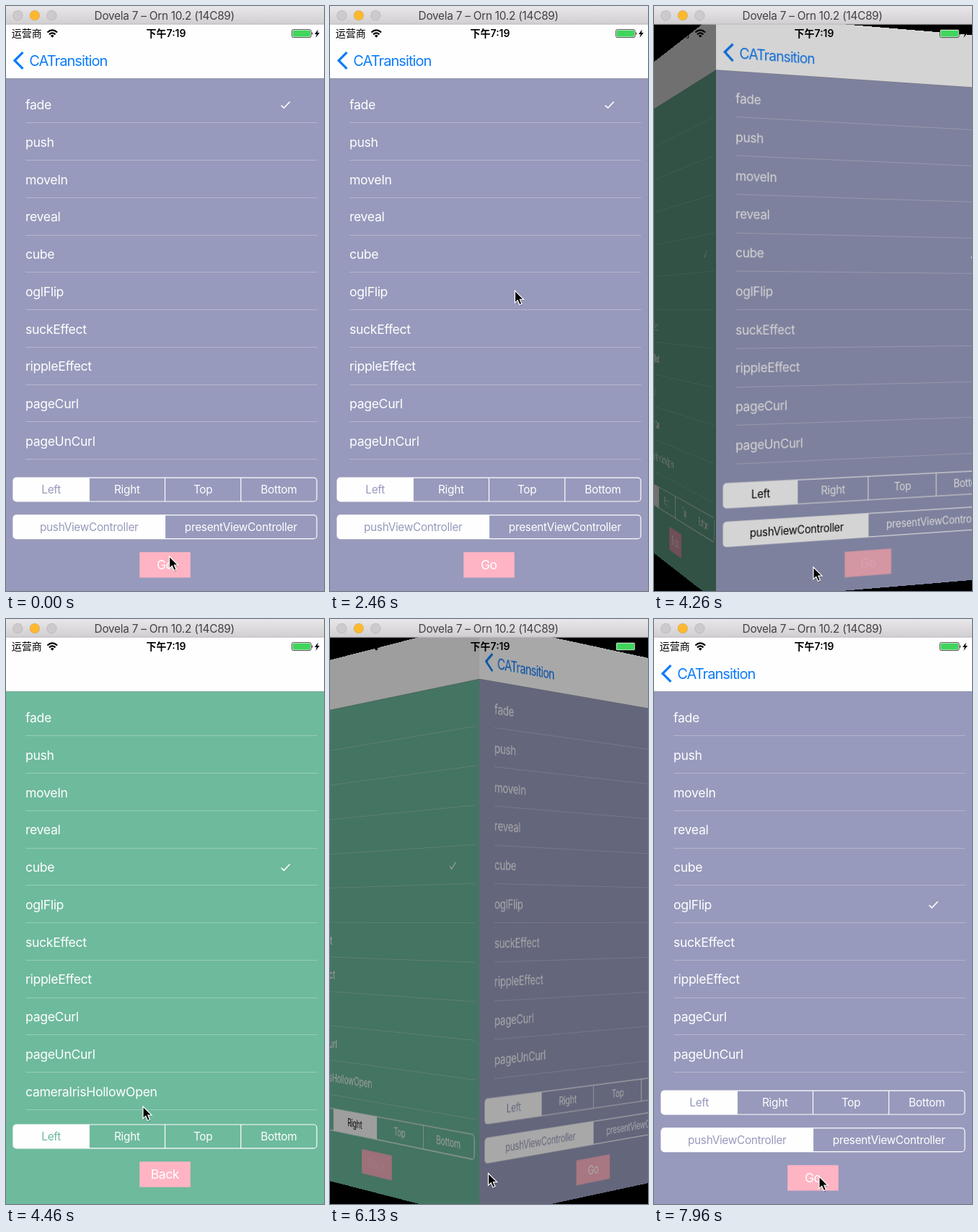
An HTML page for the animation above (8000 ms loop, 441 by 810 pixels).

```html
<!DOCTYPE html>
<html lang="en">
<head>
<meta charset="utf-8">
<title>Transition demo</title>
<style>
  html, body { margin: 0; width: 100%; height: 100%; overflow: hidden; background: #000; }
  #stage { position: relative; width: 441px; height: 810px; overflow: hidden; background: #000; }
  svg { position: absolute; left: 0; display: block; }
  .page { top: 25px; width: 441px; height: 785px; transform-origin: 50% 50%; }
  #chrome { top: 0; z-index: 5; }
  text { font-family: Inter, Roboto, "Noto Sans CJK SC", "Noto Sans CJK", sans-serif; white-space: pre; }
  .row { font-size: 17.6px; letter-spacing: -.018em; fill: #fff; }
  .seg { font-size: 15.3px; letter-spacing: -.017em; text-anchor: middle; fill: #fff; }
  .btn { font-size: 17.6px; letter-spacing: -.025em; text-anchor: middle; fill: #fff; }
  .back { font-size: 20px; letter-spacing: -.046em; fill: #0c7cfb; }
  .title { font-size: 15.3px; letter-spacing: -.015em; text-anchor: middle; fill: #414042; }
  .carrier { font: 14px "Noto Sans CJK SC", "Noto Sans CJK", sans-serif; }
  .clock { font-size: 14px; font-weight: 600; text-anchor: middle; }
</style>
</head>
<body>
<div id="stage"></div>
<script>
const LOOP = 8000, W = 441, DEPTH = 1764, ROW = 51.73;
const BAR = { x: 10, w: 421, h: 32.9 };
const NAMES = ['fade', 'push', 'moveIn', 'reveal', 'cube', 'oglFlip', 'suckEffect',
  'rippleEffect', 'pageCurl', 'pageUnCurl', 'cameraIrisHollowOpen'];
const SIDES = ['Left', 'Right', 'Top', 'Bottom'];
const MODES = ['pushViewController', 'presentViewController'];

const rect = (x, y, w, h, attrs) => `<rect x="${x}" y="${y}" width="${w}" height="${h}" ${attrs}/>`;
const label = (cls, x, y, str) => `<text class="${cls}" x="${x}" y="${y}">${str}</text>`;

function rows(count) {
  return NAMES.slice(0, count).map((name, i) => {
    const y = i * ROW;
    return label('row', 27, 143.2 + y, name) +
      rect(27, Math.round(161.4 + y), 404.5, 1, 'fill="#fff" opacity=".27"');
  }).join('');
}

function segments(id, y, items) {
  const w = BAR.w / items.length;
  const edge = i => BAR.x + i * w;
  let out = `<clipPath id="${id}">${rect(BAR.x, y, BAR.w, BAR.h, 'rx="4.5"')}</clipPath>
    <g clip-path="url(#${id})">${rect(BAR.x, y, w, BAR.h, `class="pick" data-w="${w}" fill="#fefefe"`)}</g>`;
  items.forEach((item, i) => {
    if (i) out += rect(edge(i) - .6, y, 1.2, BAR.h, 'fill="#fff"');
    out += label('seg', edge(i) + w / 2, y + BAR.h / 2 + 5.4, item);
  });
  const frame = rect(BAR.x, y, BAR.w, BAR.h, 'rx="4.5" fill="none" stroke="#fff" stroke-width="1.2"');
  return `<g class="bar">${out}${frame}</g>`;
}

function button(y, str) {
  return rect(185.2, y, 70.6, 35.3, 'fill="#ffb4c3"') + label('btn', 220.3, y + 24.1, str);
}

function page(id, bg, content) {
  return `<svg class="page" id="${id}" data-bg="${bg}" viewBox="0 25 441 785">
    ${rect(0, 25, W, 785, `fill="${bg}"`)}${rect(0, 25, W, 75.3, 'fill="#fefefe"')}
    ${rect(0, 100.3, W, .6, 'fill="#000" opacity=".3"')}${content}
    <path class="tick" d="M381.6 137.6L385.4 141.2L393.6 132.6" fill="none" stroke="#fff" stroke-width="1.6"/>
    ${rect(-1, 24, W + 2, 787, 'class="shade" fill="#000" opacity="0"')}</svg>`;
}

const homePage = page('home', '#979abc',
  `<path d="M23.4 64.2L12 75.5L23.4 86.8" fill="none" stroke="#0c7cfb" stroke-width="3.2"/>` +
  label('back', 32.2, 82.8, 'CATransition') + rows(10) +
  segments('c1', 653.1, SIDES) + segments('c2', 704.8, MODES) + button(756.2, 'Go'));

const nextPage = page('next', '#6eba9d',
  rows(11) + segments('c3', 700, SIDES) + button(751.3, 'Back'));

const chrome = `<svg id="chrome" width="441" height="810" viewBox="0 0 441 810">
  <linearGradient id="metal" x2="0" y2="1"><stop stop-color="#e9e7e9"/><stop offset="1" stop-color="#d1ced1"/></linearGradient>
  ${rect(0, 0, W, 25.4, 'fill="url(#metal)"')}${rect(0, 24.6, W, .9, 'fill="#b9b6b9"')}
  ${['#cdc9cd', '#fdb82e', '#cdc9cd'].map((c, i) =>
    `<circle cx="${16.3 + i * 23.5}" cy="13" r="6.8" fill="${c}" stroke="#000" stroke-opacity=".1"/>`).join('')}
  ${label('title', 219.8, 18.7, 'Dovela 7 – Orn 10.2 (14C89)')}
  ${label('carrier', 7.8, 43, '运营商')}${label('clock', 222, 43, '下午7:19')}
  <g fill="none" stroke="#000" stroke-width="2.2"><path d="M57.4 36.5Q64.2 30.2 71 36.5M60 39.4Q64.2 35.4 68.4 39.4"/></g>
  <path d="M61.8 41.2Q64.2 39 66.6 41.2L64.2 43.8Z"/>
  ${rect(396.5, 32.6, 26.6, 11, 'rx="2" fill="#fff" stroke="#000" stroke-width=".7"')}
  ${rect(397.6, 33.7, 24.4, 8.8, 'rx="1" fill="#40d55c"')}
  <path d="M424.2 36q2 2 0 4.2zM432.8 32.5L428 39h2.9l-1.5 5L434.8 37h-3z"/>
  <g id="cursor">
    <path d="M0 0V18L4.1 14.3L7 21L10.2 19.6L7.4 13.1H13Z" transform="translate(.8 1.8)" opacity=".25"/>
    <path d="M0 0V18L4.1 14.3L7 21L10.2 19.6L7.4 13.1H13Z" stroke="#fff" stroke-width="1.3"/>
  </g></svg>`;

const stage = document.getElementById('stage');
stage.innerHTML = homePage + nextPage + chrome;
const home = document.getElementById('home');
const next = document.getElementById('next');
const cursor = document.getElementById('cursor');

const ease = k => k * k * (3 - 2 * k);
const span = (t, from, to) => ease(Math.min(1, Math.max(0, (t - from) / (to - from))));

// Pointer moves: start, end, target x, target y
const MOVES = [
  [2150, 2533, 259.5, 356.5], [2533, 2730, 270.5, 354.5], [2760, 2830, 271, 356],
  [3300, 3900, 221, 777], [4300, 4460, 190, 675], [4460, 4860, 173, 711],
  [5160, 5700, 219.5, 767.5], [6340, 6760, 286, 425], [6800, 6930, 289, 404],
  [7400, 7960, 229, 772]
];

function pointer(t) {
  let x = 226.5, y = 762;
  for (const [from, to, tx, ty] of MOVES) {
    const k = span(t, from, to);
    x += (tx - x) * k;
    y += (ty - y) * k;
  }
  return [x, y];
}

function drawPage(el, o) {
  el.style.visibility = o.alpha > 0 ? 'visible' : 'hidden';
  el.style.opacity = o.alpha;
  el.style.zIndex = o.top ? 2 : 1;
  el.style.transform = o.angle
    ? `perspective(${DEPTH}px) translateZ(${-W / 2}px) rotateY(${o.angle}deg) translateZ(${W / 2}px)` : 'none';
  el.querySelector('.shade').setAttribute('opacity', Math.abs(o.angle) / 90 * .72);
  el.querySelector('.tick').setAttribute('transform', `translate(0 ${o.tick * ROW})`);
  el.querySelector('.btn').setAttribute('opacity', o.pressed ? .2 : 1);
  el.querySelectorAll('.bar').forEach(bar => {
    const pick = bar.querySelector('.pick');
    pick.setAttribute('x', BAR.x + o.side * pick.dataset.w);
    bar.querySelectorAll('.seg').forEach((s, i) => {
      s.style.fill = i !== o.side ? '#fff' : o.leaving ? '#000' : el.dataset.bg;
    });
  });
}

function draw(t) {
  const tick = t < 3130 ? 0 : t < 7230 ? 4 : 5;
  const fade = span(t, 715, 1060) - span(t, 1915, 2260);
  const turn = span(t, 4172, 4460) - span(t, 5981, 6271);
  const turning = turn > 0 && turn < 1;
  const angle = turn * 90;

  drawPage(home, {
    tick, side: 0, angle: turning ? angle : 0, alpha: turn < 1 ? 1 : 0, top: turn < .5 && turn > 0,
    leaving: turning && t < 5000, pressed: t >= 4130 && t < 4460
  });
  drawPage(next, {
    tick, side: t >= 5100 && t < 6400 ? 1 : 0, angle: turning ? angle - 90 : 0,
    alpha: turn > 0 ? 1 : fade, top: turn >= .5 || turn === 0,
    leaving: turning && t > 5000, pressed: t >= 5960 && t < 6271
  });
  cursor.setAttribute('transform', `translate(${pointer(t).join(' ')}) scale(.93)`);
}

const began = performance.now();
function frame() {
  draw((performance.now() - began) % LOOP);
  requestAnimationFrame(frame);
}
frame();
</script>
</body>
</html>
```
